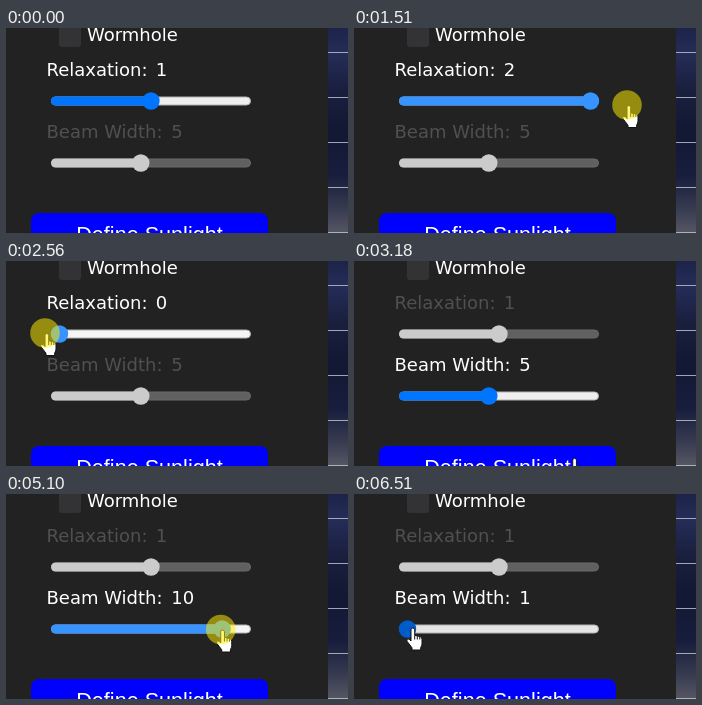
Write an HTML page that moves like this. It is 342 px wide and 205 px high and loops after 6540 ms.

```html
<!DOCTYPE html>
<html lang="en">
<head>
<meta charset="utf-8">
<title>Slider demo</title>
<style>
  html, body { margin: 0; width: 100%; height: 100%; overflow: hidden; background: #222; }
  svg { display: block; position: absolute; left: 0; top: 0; }
  text { font: 18px "DejaVu Sans", Verdana, sans-serif; fill: #fff; }
  .button { font: 21.6px "Liberation Sans", Arial, sans-serif; }
</style>
</head>
<body>
<svg width="342" height="205" viewBox="0 0 342 205">
  <defs>
    <linearGradient id="night" x2="0" y2="1">
      <stop offset="0" stop-color="#1d2348"/>
      <stop offset=".12" stop-color="#252d58"/>
      <stop offset=".3" stop-color="#1a1f3e"/>
      <stop offset=".5" stop-color="#121833"/>
      <stop offset=".72" stop-color="#171d3c"/>
      <stop offset=".88" stop-color="#373b50"/>
      <stop offset="1" stop-color="#565764"/>
    </linearGradient>
  </defs>
  <rect width="342" height="205" fill="#222"/>
  <rect x="322" width="20" height="205" fill="url(#night)"/>
  <path d="M322 24.5h20m-20 45h20m-20 45h20m-20 45h20m-20 45h20" stroke="#c4c8d4" stroke-opacity=".8"/>
  <rect x="53" y="-4" width="22" height="23" rx="3" fill="#333336"/>
  <text x="81" y="13">Wormhole</text>
  <rect x="25" y="185" width="237" height="40" rx="8" fill="#00f"/>
  <text class="button" x="143.5" y="213.5" text-anchor="middle">Define Sunlight</text>
  <g id="first"></g>
  <g id="second"></g>
</svg>
<script>
const LOOP = 6540, LAG = 45, FADE = [2640, 2940];
const LEFT = 53.5, SPAN = 183; // range of the thumb centre

const sliders = [
  { label: 'Relaxation:', y: 73, valueX: 149.8, min: 0, max: 2, step: 0.1, start: 1 },
  { label: 'Beam Width:', y: 135, valueX: 165.2, min: 1, max: 10, step: 1, start: 5 }
];

// Each clip: the enabled slider, the pressed interval, and pointer keys [time, x, y].
const clips = [
  { active: 0, from: 210, press: 890, release: 3000, approach: 860, path: [
    [210, 264, 204], [860, 147.5, 74.5], [890, 147.5, 74.5], [1510, 273, 77],
    [1610, 273, 77], [2140, 116, 73], [2260, 84, 73], [2290, 82, 73], [2460, 39, 72]] },
  { active: 1, from: 3180, press: 4020, release: 6390, approach: 3840, path: [
    [3180, 219, 197], [3840, 135, 138.5], [4150, 135, 138.5], [4310, 159, 138],
    [4650, 231, 138], [4760, 252, 138], [4965, 252, 138], [5100, 215, 135.5],
    [5330, 156, 137], [5600, 102, 136], [5940, 66, 134.5], [6000, 59, 134],
    [6170, 52, 133], [6380, 52, 133], [6510, 57, 133.5]] }
];

const clamp = (v, a, b) => Math.min(b, Math.max(a, v));

function pointer(clip, t) {
  const p = clip.path;
  let i = 0;
  while (i < p.length - 2 && t >= p[i + 1][0]) i++;
  const [t0, x0, y0] = p[i], [t1, x1, y1] = p[i + 1];
  let k = clamp((t - t0) / (t1 - t0), 0, 1);
  if (t < clip.approach) k *= 2 - k;
  return [x0 + (x1 - x0) * k, y0 + (y1 - y0) * k];
}

function valueAt(clip, s, t) {
  if (t < clip.press) return s.start;
  const raw = (pointer(clip, t)[0] - LEFT) / SPAN * (s.max - s.min);
  return clamp(s.min + Math.round(raw / s.step) * s.step, s.min, s.max);
}

function slider(s, value, shown, state) {
  const [fill, track, ink] = {
    off: ['#cbcbcb', '#606062', '#505050'],
    on: ['#0075ff', '#efefef', '#fff'],
    hover: ['#005cc8', '#e5e5e5', '#fff'],
    down: ['#3793ff', '#f5f5f5', '#fff']
  }[state];
  const x = LEFT + (value - s.min) / (s.max - s.min) * SPAN;
  const edge = state === 'off' ? '#6a6a6a' : '#b2b2b2';
  return `<text x="40.5" y="${s.y - 25}" style="fill:${ink}">${s.label}</text>
    <text x="${s.valueX}" y="${s.y - 25}" style="fill:${ink}">${+shown.toFixed(1)}</text>
    <rect x="45.5" y="${s.y - 4}" width="199" height="8" rx="4" fill="${track}" stroke="${edge}"/>
    <rect x="45" y="${s.y - 4.5}" width="${x - 45}" height="9" rx="4.5" fill="${fill}"/>
    <circle cx="${x}" cy="${s.y}" r="8.7" fill="${fill}"/>`;
}

function cursor(x, y, hand) {
  const shape = hand
    ? 'M0 2.3Q0 .5 1.8.5T3.7 2.3V7.8L9 9Q11 9.6 11 11.8V16Q11 18 9.7 20V22.5H1V20.3L-3.8 14Q-4.8 12.2-3.4 11.5T0 13.5ZM3.7 8V12M6.3 8.5V12M8.8 9V12'
    : 'M0 0V16L3.7 12.6 6.2 18 8.7 17 6.3 11.6H11.3Z';
  return `<path transform="translate(${x} ${y})" d="${shape}" fill="#fff" stroke="#111"/>`;
}

function scene(clip, t) {
  const [x, y] = pointer(clip, t);
  const visible = t >= clip.from;
  const down = t >= clip.press && t < clip.release;
  const own = sliders[clip.active];
  const over = visible && x > 45 && x < 245 && Math.abs(y - own.y) < 9;
  let out = sliders.map((s, i) => i === clip.active
    ? slider(s, valueAt(clip, s, t), valueAt(clip, s, t - LAG), down ? 'down' : over ? 'hover' : 'on')
    : slider(s, s.start, s.start, 'off')).join('');
  const onButton = x > 25 && x < 262 && y > 185;
  if (visible) out += cursor(x, y, down || over || onButton);
  if (down) out += `<circle cx="${x}" cy="${y}" r="14.8" fill="#ffee00" fill-opacity=".52"/>`;
  return out;
}

const first = document.getElementById('first'), second = document.getElementById('second');

function draw(t) {
  const mix = clamp((t - FADE[0]) / (FADE[1] - FADE[0]), 0, 1);
  first.innerHTML = mix < 1 ? scene(clips[0], t) : '';
  second.innerHTML = mix > 0 ? '<rect x="20" y="28" width="290" height="126" fill="#222"/>' + scene(clips[1], t) : '';
  second.setAttribute('opacity', mix);
}

const begin = performance.now();
function tick() {
  draw((performance.now() - begin) % LOOP);
  requestAnimationFrame(tick);
}
tick();
</script>
</body>
</html>
```
